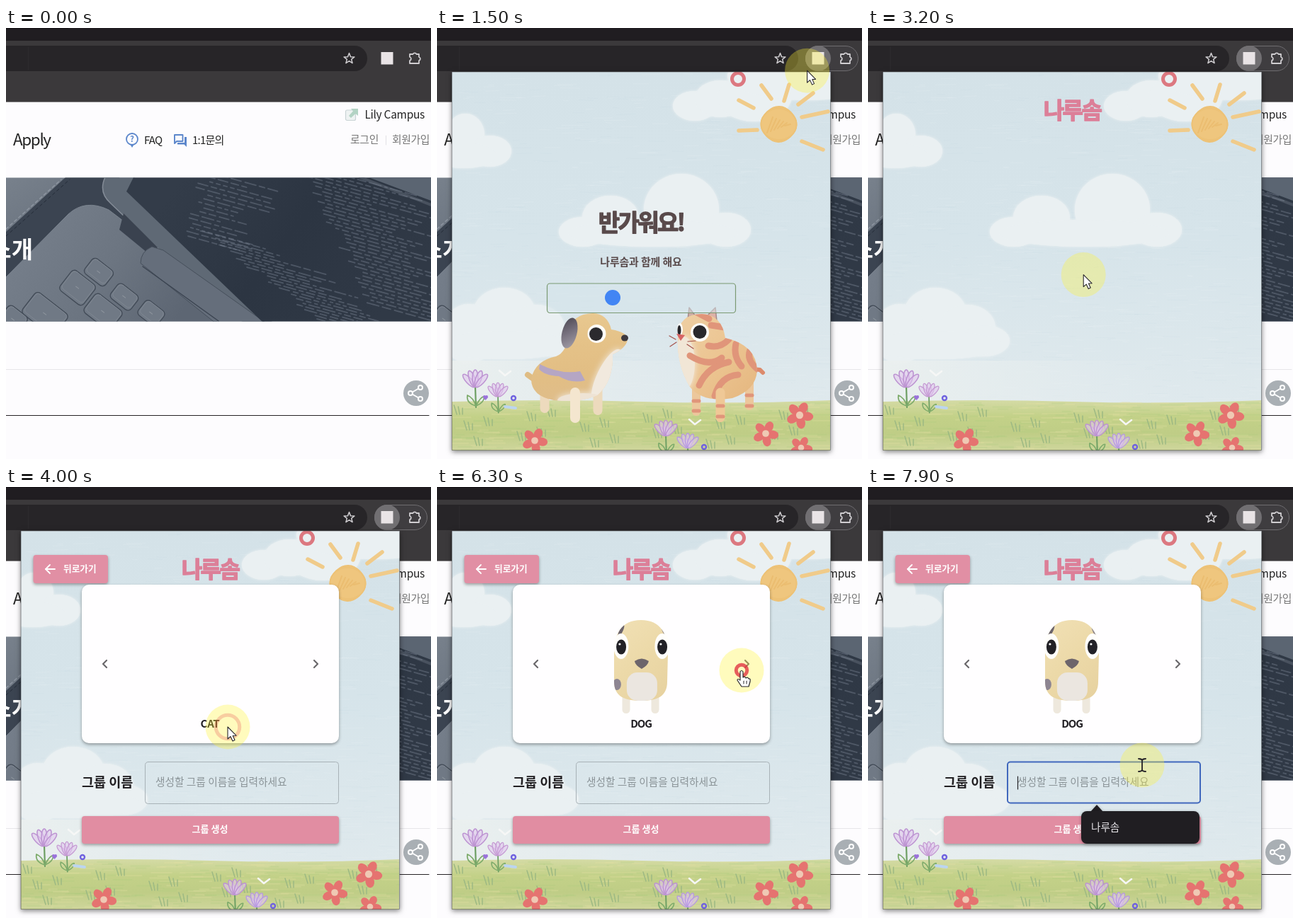
Write an HTML page with a canvas that moves like this. It is 600 px wide and 609 px high and loops after 8000 ms.

```html
<!DOCTYPE html>
<html lang="ko">
<head>
<meta charset="utf-8">
<style>
html, body { margin: 0; width: 600px; height: 609px; overflow: hidden; background: #fdfcfe; }
canvas { display: block; }
</style>
</head>
<body>
<canvas id="stage" width="600" height="609"></canvas>
<script>
const FONT = "'Noto Sans CJK KR', 'Noto Sans KR', 'Noto Sans CJK', 'Noto Sans CJK JP', sans-serif";
const BRAND = '나루솜';
const LOOP = 8000, STEP = 100, TAU = Math.PI * 2;
const stage = document.getElementById('stage').getContext('2d');
let g = stage;

function random(seed) {
  return () => (seed = (seed * 16807) % 2147483647) / 2147483647;
}

// drawing helpers
function paint(fill, stroke, width = 1) {
  if (fill) { g.fillStyle = fill; g.fill(); }
  if (stroke) { g.strokeStyle = stroke; g.lineWidth = width; g.stroke(); }
}
function box(x, y, w, h, r, fill, stroke, width) {
  g.beginPath(); g.roundRect(x, y, w, h, r); paint(fill, stroke, width);
}
function oval(x, y, rx, ry, fill, stroke, width, turn = 0) {
  g.beginPath(); g.ellipse(x, y, rx, ry, turn, 0, TAU); paint(fill, stroke, width);
}
function disc(x, y, r, fill, stroke, width) { oval(x, y, r, r, fill, stroke, width); }
function poly(pts, fill, stroke, width, open) {
  g.beginPath();
  for (let i = 0; i < pts.length; i += 2) g.lineTo(pts[i], pts[i + 1]);
  if (!open) g.closePath();
  paint(fill, stroke, width);
}
function line(pts, color, width) { poly(pts, null, color, width, true); }
function shape(d, fill, stroke, width = 1) {
  const p = new Path2D(d);
  if (fill) { g.fillStyle = fill; g.fill(p); }
  if (stroke) { g.strokeStyle = stroke; g.lineWidth = width; g.stroke(p); }
}
function text(s, x, y, size, color, weight = 400, align = 'left', gap = 0) {
  g.font = `${weight} ${size}px ${FONT}`;
  g.textAlign = align;
  g.letterSpacing = gap + 'px';
  g.fillStyle = color;
  g.fillText(s, x, y + size * 0.37);
}
function heading(s, x, y, size, color) {
  text(s, x, y, size, color, 900, 'center', -size * 0.08);
  g.strokeStyle = color; g.lineWidth = 1.3;
  g.strokeText(s, x, y + size * 0.37);
}
function fade(x0, y0, x1, y1, ...colors) {
  const f = g.createLinearGradient(x0, y0, x1, y1);
  colors.forEach((c, i) => f.addColorStop(i / (colors.length - 1), c));
  return f;
}
function shadow(blur, y, alpha) {
  g.shadowColor = `rgba(0,0,0,${alpha})`; g.shadowBlur = blur; g.shadowOffsetY = y;
}
function noShadow() { g.shadowColor = 'transparent'; g.shadowBlur = g.shadowOffsetY = 0; }
function layer(draw) {
  const c = document.createElement('canvas');
  c.width = 600; c.height = 609;
  g = c.getContext('2d');
  g.lineCap = g.lineJoin = 'round';
  draw();
  g = stage;
  return c;
}

// web page behind the popup
function codeLines(rnd, rows, x0, y0, dx, dy, reach) {
  for (let row = 0; row < rows; row++) {
    g.save();
    g.translate(x0 + row * dx, y0 + row * dy);
    g.rotate(0.27);
    g.setLineDash([1.6, 1]);
    const end = reach * (0.45 + rnd() * 0.55);
    for (let x = rnd() * 22; x < end;) {
      const w = 3 + rnd() * 15;
      line([x, 0, x + w, 0], 'rgba(150,160,174,.3)', 1.9);
      x += w + 5;
    }
    g.restore();
  }
}
function banner() {
  g.save();
  g.beginPath(); g.rect(0, 211.5, 600, 203); g.clip();
  g.fillStyle = fade(0, 211, 60, 300, '#78818c', '#69727e'); g.fillRect(0, 211, 600, 204);
  poly([84, 211, 160, 211, 180, 280, 0, 400, 0, 288], '#3b4451');
  g.setLineDash([4, 4]);
  line([0, 284, 78, 214], '#8d95a0', 1.5);
  line([0, 294, 90, 214], '#242c38', 1);
  g.setLineDash([]);
  shape('M0 352 L88 263 Q112 241 145 257 L280 360 L300 420 L0 420Z', fade(40, 280, 240, 414, '#757e8a', '#6c7581', '#5d6673'), '#7b848f', 1);
  shape('M140 211 Q130 232 148 248 L215 312 L340 420 L380 420 L180 211Z', '#5f6975', '#848c97', 1.5);
  shape('M166 262 L214 310 L205 322 L160 285Z', '#3a424f');
  shape('M190 332 Q190 316 206 309 L222 314 L366 416 L300 420Z', '#656e7b', '#464f5b', 1);
  line([193, 337, 300, 414], '#3b4451', 1.5);
  const screen = new Path2D('M180 211 L600 211 L600 420 L367 420 L170 231Z');
  g.fillStyle = fade(250, 211, 520, 414, '#333c49', '#2c3542', '#303946'); g.fill(screen);
  poly([512, 211, 600, 211, 600, 244], '#5b6572');
  line([500, 211, 600, 250], '#49525f', 4);
  const keys = [[131, 345, 37, 27], [167, 380, 36, 26], [205, 403, 34, 26], [101, 367, 42, 36], [137, 401, 48, 34], [55, 404, 58, 38], [10, 412, 34, 30]];
  for (const [x, y, w, h] of keys) {
    g.save(); g.translate(x, y); g.rotate(0.66);
    box(-w / 2, -h / 2, w, h, 6, '#707985', '#434c58', 1.4);
    box(-w / 2 + 2, -h / 2 + 1, w - 4, h - 5, 5, null, '#818993', 0.8);
    line([-3, 0, 2, 0], '#8f969f', 1);
    g.restore();
  }
  g.clip(screen);
  const rnd = random(41);
  codeLines(rnd, 17, 278, 195, -2, 6, 110);
  codeLines(rnd, 25, 272, 286, 8.5, 6.5, 170);
  codeLines(rnd, 34, 410, 190, 3, 6, 190);
  g.restore();
  text('소개', 38, 313, 33, '#fff', 700, 'right');
}

const page = layer(() => {
  g.fillStyle = '#fdfcfe'; g.fillRect(0, 0, 600, 609);
  g.fillStyle = '#3b393b'; g.fillRect(0, 0, 600, 104.6);
  g.fillStyle = '#201d21'; g.fillRect(0, 0, 600, 18);
  g.fillStyle = '#131114'; g.fillRect(0, 0, 88, 1);
  box(-30, 25, 540, 36, 18, '#272528');
  line([31.5, 27, 31.5, 59], '#2d2b2e', 1);

  const star = [];
  for (let i = 0; i < 10; i++) {
    const a = i * Math.PI / 5 - Math.PI / 2, r = i % 2 ? 3.3 : 7.8;
    star.push(484.5 + Math.cos(a) * r, 43.3 + Math.sin(a) * r);
  }
  poly(star, null, '#cfcdd0', 1.5);

  g.save(); g.translate(479, 113);
  box(0.5, 3, 14, 14.5, 2, '#eef2f2', '#c9d3d5', 1.2);
  poly([8, 1, 18, 1, 18, 11, 14.5, 8, 8, 14, 5, 11, 11, 4.5], '#b3d3c4');
  g.restore();
  text('Lily Campus', 591, 122, 15.5, '#222', 400, 'right', -0.3);
  text('Apply', 10, 158, 22.5, '#222', 400, 'left', -1.4);
  disc(178, 157, 8, null, '#5b86cb', 1.8);
  poly([175, 164, 181, 164, 178, 169], '#5b86cb');
  text('?', 178, 157, 11.5, '#5b86cb', 700, 'center');
  text('FAQ', 195, 158, 15, '#222', 400, 'left', -0.8);
  shape('M238 151 H249.5 V160 H241 L238 163Z', null, '#5b86cb', 1.9);
  shape('M252 154 H255 V168 L251.5 164.5 H242 V162 H252Z', '#5b86cb');
  text('1:1문의', 263, 158, 15, '#222', 400, 'left', -0.8);
  text('로그인', 486, 158, 14.8, '#777', 300, 'left', -0.3);
  line([536.5, 152, 536.5, 165], '#e2e2e5', 1);
  text('회원가입', 545, 158, 14.8, '#777', 300, 'left', -0.4);

  banner();
  line([0, 482.5, 598, 482.5], '#e6e6e9', 1);
  line([0, 547.5, 597, 547.5], '#252225', 1.2);
  disc(579, 516, 18, '#a9afb4');
  line([585, 508, 571, 516, 585, 524], '#fff', 2);
  for (const [x, y] of [[585, 508], [571, 516], [585, 524]]) disc(x, y, 3, '#a9afb4', '#fff', 2);
});

// popup scenery
function cloud(...blobs) {
  g.shadowColor = '#edf2f3'; g.shadowBlur = 4;
  for (const b of blobs) oval(...b, '#eaf0f2');
  noShadow();
  for (const b of blobs) oval(...b, '#eaf0f2');
}
function tulip(x, y, s, color) {
  g.save(); g.translate(x, y); g.scale(s, s);
  line([0, 12, 1, 42], '#6d9f63', 2.2);
  shape('M1 40 Q-13 36 -11 25 Q-3 28 1 40 Q8 26 13 27 Q12 36 1 40', null, '#7dab6a', 1.8);
  for (const a of [-0.75, -0.35, 0, 0.35, 0.75]) {
    g.save(); g.translate(0, 14); g.rotate(a);
    oval(0, -13, 4, 12, 'rgba(226,200,238,.6)', color, 1.6);
    g.restore();
  }
  g.restore();
}
function blossom(x, y, r) {
  for (let i = 0; i < 5; i++) {
    const a = i * TAU / 5 - 1.1;
    oval(x + Math.cos(a) * r * 0.58, y + Math.sin(a) * r * 0.58, r * 0.44, r * 0.33, '#e57370', null, 0, a);
  }
  disc(x, y, r * 0.27, '#efc9b4');
}

const scenery = layer(() => {
  shadow(7, 2, 0.5);
  g.fillStyle = '#d8e5eb'; g.fillRect(21, 62, 534.5, 535);
  noShadow();
  g.beginPath(); g.rect(21, 62, 534.5, 535); g.clip();
  g.fillStyle = fade(0, 62, 0, 530, '#d4e2e8', '#d6e4ea', '#dfe9ed'); g.fillRect(21, 62, 535, 535);
  const rnd = random(7);
  for (let i = 0; i < 700; i++) {
    const x = 21 + rnd() * 534, y = 62 + rnd() * 465;
    line([x, y, x + 6 + rnd() * 25, y + rnd() * 2 - 1], rnd() < 0.6 ? 'rgba(255,255,255,.1)' : 'rgba(150,185,205,.06)', 1);
  }
  cloud([364, 110, 31, 21], [400, 100, 36, 26], [448, 98, 52, 34], [520, 68, 110, 34]);
  cloud([40, 151, 27, 30], [75, 174, 30, 22], [38, 180, 46, 18]);
  cloud([206, 288, 34, 21], [245, 268, 40, 31], [345, 257, 53, 51], [408, 285, 35, 24], [305, 290, 120, 19]);
  cloud([95, 403, 44, 36], [45, 432, 38, 42], [140, 424, 40, 33], [164, 442, 36, 22], [95, 448, 95, 20]);
  g.fillStyle = fade(21, 0, 440, 0, 'rgba(235,240,239,.95)', 'rgba(230,237,239,0)'); g.fillRect(21, 470, 535, 60);

  for (let i = 0; i < 5; i++) oval(482.5, 136, 25 - i % 2 * 3, 22 + i % 2 * 2, '#efc67e', '#edc277', 2, i * 0.8);
  for (let i = 0; i < 6; i++) line([466 + i * 5, 148 - i * 2, 474 + i * 5, 126 + i * 2], '#ebbd70', 2);
  const rays = [[426, 102, 447, 113], [458, 81, 472, 100], [497, 80, 490, 103], [531, 92, 510, 108], [515, 126, 552, 118], [515, 160, 545, 172], [426, 145, 452, 144]];
  for (const r of rays) line(r, '#f0cb8a', 5.5);
  disc(425, 72, 8.5, null, '#dc7880', 5);

  shape('M21 528 Q160 524 290 528 T555 526 V597 H21Z', fade(0, 525, 0, 597, '#d5dba6', '#c3d188', '#bfcd86', '#cfd69c'));
  for (let i = 0; i < 260; i++) {
    const x = 21 + rnd() * 534, y = 529 + rnd() * 68;
    line([x, y, x + 10 + rnd() * 25, y], rnd() < 0.55 ? 'rgba(226,221,160,.28)' : 'rgba(165,198,120,.2)', 2);
  }
  for (let i = 0; i < 24; i++) {
    const x = 32 + (i * 89) % 520, y = 538 + (i * 37) % 50;
    for (let k = -1; k < 2; k++) line([x + k * 4, y + 8, x + k * 6 - 2, y - 3 + k * 2], '#9db983', 1.5);
  }
  tulip(54, 494, 1, '#bd94d2'); tulip(86, 510, 0.8, '#c59ad3');
  tulip(323, 564, 0.9, '#bd94d2'); tulip(354, 582, 0.85, '#b79ae0');
  blossom(138, 583, 18); blossom(512, 547, 19); blossom(464, 573, 18); blossom(514, 593, 16);
  line([88, 484, 96, 491, 104, 485], '#f6f7f6', 2.5);
  line([356, 553, 364, 560, 372, 554], '#f6f7f6', 2.5);
  disc(108, 523, 3, null, '#7063df', 2.4); disc(377, 592, 3, null, '#7063df', 2.4);
  disc(67, 521, 2, '#9a72da'); disc(70, 521, 2, '#9a72da'); poly([65, 522, 72, 522, 68.5, 526], '#9a72da');
  line([96, 535, 111, 537], '#bcd5ef', 4);
});

function leg(x, y0, y1, w, color) { line([x, y0, x, y1 - w / 2], color, w); }

const greeting = layer(() => {
  // dog
  line([128, 490, 142, 500], '#dfbc83', 8);
  leg(152, 510, 544, 13, '#eddabd'); leg(227, 505, 547, 13, '#eddabd');
  const dog = new Path2D('M133 496 Q138 470 168 464 Q184 458 185 430 Q190 404 220 403 Q241 404 246 426 Q270 430 269 441 Q266 453 248 461 Q249 500 226 519 Q200 530 165 526 Q133 520 133 496Z');
  g.save();
  g.fillStyle = fade(190, 405, 200, 528, '#e8c890', '#e5c288', '#e2be84', '#dfbd8a'); g.fill(dog);
  g.clip(dog);
  g.shadowColor = '#f3ece2'; g.shadowBlur = 10;
  oval(240, 492, 14, 42, '#f1e9de', null, 0, 0.45);
  oval(206, 526, 36, 10, '#eee3d5');
  noShadow();
  g.restore();
  leg(195, 515, 558, 14, '#f4e6cf');
  shape('M145 475 Q174 490 202 485 L209 498 Q190 503 172 492 Q152 491 144 482Z', '#b5a6c4');
  oval(187, 431, 10.5, 22, fade(177, 410, 196, 450, '#4b4650', '#77717e', '#a19ca6'), null, 0, 0.25);
  disc(225.5, 432, 13, '#fffdf8'); disc(224.5, 432.5, 9.5, '#2b2a2e');
  oval(265, 438, 5, 4.5, '#3d3940');
  // cat
  line([446, 482, 456, 483, 460, 487], '#dc8a6c', 6);
  leg(366, 510, 548, 12, '#ecc79c'); leg(441, 500, 540, 12, '#ecc79c');
  poly([354, 412, 356, 395, 365, 407], '#cdada6', '#a58a88', 1.5);
  poly([381, 407, 393, 395, 395, 414], '#dcb1a7', '#a58a88', 1.5);
  const cat = new Path2D('M340 436 Q341 404 374 404 Q402 405 407 438 Q451 448 452 484 Q450 512 417 523 Q375 530 357 507 Q338 475 340 436Z');
  g.save();
  g.fillStyle = fade(345, 420, 445, 510, '#eecda0', '#ecc592', '#e6b982'); g.fill(cat);
  g.clip(cat);
  g.shadowColor = '#f4ebdf'; g.shadowBlur = 10;
  oval(349, 474, 15, 38, '#f1e6d6');
  noShadow();
  for (const s of ['M367 402 L384 411', 'M387 420 L412 424', 'M383 449 Q400 453 412 440', 'M357 463 Q384 480 402 466', 'M370 505 Q382 478 412 472', 'M422 446 Q418 464 430 478', 'M442 455 Q436 470 455 484', 'M392 520 Q400 492 425 490'])
    shape(s, null, '#e0957a', 9);
  g.restore();
  leg(400, 515, 557, 13, '#efc896');
  for (const [x, y] of [[366, 527], [366, 541], [400, 534], [400, 549], [441, 519], [441, 534]]) line([x - 4, y, x + 4, y], '#e0957a', 5);
  disc(371, 430, 13, '#fffdf8'); disc(371, 429.5, 9.5, '#29282c');
  oval(343, 426, 4, 9, '#fffdf8'); oval(342, 427, 2.5, 7, '#29282c');
  poly([338, 432, 350, 434, 344, 442], '#d76464');
  for (const w of [[337, 440, 328, 435], [338, 444, 329, 450], [354, 443, 365, 442], [353, 447, 362, 453]]) line(w, '#a45149', 1.2);

  heading('반가워요!', 288, 275, 33, '#594a4b');
  text(BRAND + '과 함께 해요', 288, 330, 14.9, '#594a4b', 700, 'center', -0.1);
});

const form = layer(() => {
  shadow(4, 2, 0.35);
  box(38.5, 96, 105.5, 40, 4, '#e18fa4');
  box(107, 138, 363, 224, 10, '#fffeff');
  box(107, 465, 363, 39, 4, '#e18da2');
  noShadow();
  line([69, 116, 56, 116], '#fff', 1.8);
  line([62, 110, 56, 116, 62, 122], '#fff', 1.8);
  text('뒤로가기', 81, 115, 12.7, '#fff', 700);
  line([142, 245, 137, 250, 142, 255], '#6b696c', 2.2);
  text('그룹 이름', 107, 417, 18.5, '#211f22', 700);
  text('생성할 그룹 이름을 입력하세요', 211, 417, 14.7, '#8b9498', 500);
  text('그룹 생성', 288, 483, 13, '#fff', 700, 'center');
});

// front-facing models in the card
function catModel(s) {
  poly([251, 203, 258, 177, 272, 192], '#d5b0aa', '#8b7f86', 2);
  poly([305, 192, 318, 177, 324, 203], '#d5b0aa', '#8b7f86', 2);
  leg(264, 300, 336, 12, '#f1e2d0'); leg(312, 300, 336, 12, '#f1e2d0');
  const body = new Path2D('M288 189 C322 189 337 215 337 254 C337 298 318 315 288 316 C258 315 239 298 239 254 C239 215 254 189 288 189Z');
  g.save();
  g.fillStyle = fade(239, 200, 337, 310, '#f3dfc4', '#efd5b2', '#ecccaa'); g.fill(body);
  g.clip(body);
  for (const y of [199, 267, 295]) shape(`M235 ${y - 5} Q288 ${y + 8} 342 ${y - 5}`, null, '#e9b594', 10);
  line([282 + s, 188, 282 + s, 214], '#eabf9c', 6);
  line([296 + s, 188, 296 + s, 214], '#eabf9c', 6);
  oval(288 + s, 267, 27, 17, 'rgba(247,235,218,.8)');
  g.restore();
  for (const [x, px] of [[259, 257], [318, 320]]) {
    oval(x + s, 232, 15, 19, '#fffefc');
    oval(px + s, 233, 9.5, 13, '#26252a');
    disc(px + s - 2, 227, 2, '#77757c');
  }
  shape(`M${277 + s} 247 Q${288 + s} 240 ${299 + s} 247 L${288 + s} 261Z`, '#e58573');
  for (const d of [-1, 1])
    for (const [y, e] of [[256, 252], [260, 260], [264, 271]]) line([288 + s + d * 17, y, 288 + s + d * 36, e], '#ae8a72', 1.1);
}
function dogModel(s) {
  leg(267, 290, 320, 11, '#eee8dd'); leg(308, 290, 320, 11, '#eee8dd');
  const body = new Path2D('M288 188 C316 188 326 208 326 235 L325 275 C325 296 311 302 288 302 C265 302 250 296 250 275 L250 235 C250 208 260 188 288 188Z');
  g.save();
  g.fillStyle = fade(250, 200, 326, 290, '#f0dfb3', '#ecd9a8', '#e7d2a0'); g.fill(body);
  g.clip(body);
  oval(259 + s, 203, 2.5, 9, '#6b646c', null, 0, 0.45);
  oval(319 + s, 204, 1.5, 7, '#8b848c', null, 0, -0.45);
  oval(253 + s, 279, 6, 8, '#8d8592');
  box(267 + s, 262, 43, 40, 15, '#ebe6e0');
  g.restore();
  for (const x of [259, 317]) {
    oval(x + s, 225, 10.5, 18, '#fffefb');
    oval(x + s * 1.2, 226, 7, 10.5, '#222126');
    disc(x + s - 2, 222, 1.6, '#fff');
  }
  shape(`M${278 + s} 246 Q${288 + s} 239 ${298 + s} 246 Q${297 + s} 252 ${288 + s} 257 Q${279 + s} 252 ${278 + s} 246Z`, '#6d656b');
}

// pointer
const path = [[500, 640, 290], [1000, 535, 44], [1400, 535, 44], [2150, 279, 376], [2600, 279, 376], [3500, 313, 339],
  [4150, 313, 339], [5000, 439, 239], [5400, 439, 239], [6100, 430, 259], [6450, 430, 259], [7250, 387, 393], [LOOP, 387, 393]];
const clicks = [1040, 2170, 3830, 6250, 7450];

function pointerAt(t) {
  const i = path.findIndex(p => p[0] > t);
  if (i < 1) return null;
  const [t0, x0, y0] = path[i - 1], [t1, x1, y1] = path[i];
  const u = (t - t0) / (t1 - t0), e = u * u * (3 - 2 * u);
  return [x0 + (x1 - x0) * e, y0 + (y1 - y0) * e];
}

function pointer(t) {
  const p = pointerAt(t);
  if (!p) return;
  const [x, y] = p;
  disc(x, y, 31.5, 'rgba(255,242,50,.32)');
  for (const c of clicks) {
    const age = (t - c) / 1000;
    if (age >= 0 && age < 0.22) {
      g.globalAlpha = 1 - age / 0.22;
      disc(x, y, 4 + age * 75, null, '#e0303f', 5);
      g.globalAlpha = 1;
    }
  }
  g.save(); g.translate(x, y);
  const overArrow = t >= 4800 && t < 6700;
  const overInput = t >= 7000;
  if (overInput) {
    shape('M-5 -9 Q-1 -9 0 -7 Q1 -9 5 -9 M0 -7 V7 M-5 9 Q-1 9 0 7 Q1 9 5 9', null, '#242226', 1.8);
  } else if (overArrow) {
    shape('M-2 2 Q0 -1 2 2 V10 Q5 8 6 11 Q9 9 10 12 Q13 11 12 16 L10 23 H0 L-6 14 Q-6 11 -2 14Z', '#fff', '#29272b', 1.2);
    line([3, 15, 3, 19], '#29272b', 1); line([7, 15, 7, 19], '#29272b', 1);
  } else {
    poly([0, 0, 0, 17, 4, 13.5, 7, 20, 10, 18.5, 7.2, 12.5, 12, 12.2], '#fff', '#29272b', 1.1);
  }
  g.restore();
}

function extensions(t) {
  if (t >= 1000) {
    box(520.5, 25.5, 74, 35, 17.5, '#3f3d40', '#6f6d70', 1);
    if (t >= 1400) disc(538, 43, 18, '#716f72');
  }
  box(529.5, 34, 17, 17.5, 0, '#e9e4e6');
  shape('M570 37 H574.5 A2.7 2.7 0 0 1 579.5 37 H583 V41 A2.6 2.6 0 0 1 583 46 V50 H570 V46 A2.6 2.6 0 0 0 570 41Z', null, '#d0ced1', 1.8);
}

function signIn(t) {
  g.drawImage(greeting, 0, 0);
  box(155.5, 361, 266, 41.5, 4, 'rgba(214,230,236,.5)');
  if (t >= 2200) text('SIGNING IN...', 265, 381, 12.3, '#a9b5b9', 400);
  const grow = Math.min(1, Math.max(0, (t - 1950) / 150));
  const shrink = Math.min(1, Math.max(0, (t - 2200) / 172));
  const w = 266 * (grow - shrink);
  if (w > 0) box(155.5, 361, w, 41.5, [4, 0, 0, 4], '#1d1b1e');
  box(155.5, 361, 266, 41.5, 4, null, '#7b9a72', 1.2);
  disc(248, 381, 11, '#4285f4');
}

function groupForm(t) {
  g.drawImage(form, 0, 0);
  const sway = 1.6 * Math.sin((t - 5300) / 800);
  if (t >= 6300) dogModel(sway * 0.6);
  else if (t >= 4300) catModel(sway);
  text(t >= 6300 ? 'DOG' : 'CAT', 288, 334, 15, '#222024', 700, 'center', t >= 6300 ? -1.2 : -0.3);
  if (t < 4800 || t >= 5500) line([435, 245, 440, 250, 435, 255], '#6b696c', 2.2);
  const focus = t >= 7500;
  if (focus) {
    box(197, 388.5, 272, 58, 4, null, '#4168bd', 2);
    if ((t - 7500) % 1000 < 500) line([211.5, 409, 211.5, 427], '#252327', 1.2);
  } else {
    box(196.5, 388.5, 273, 59, 4, null, '#a8b2b7', 1);
  }
  if (t >= 7600) {
    shadow(4, 1, 0.3);
    poly([314, 459, 323, 449, 332, 459], '#201e22');
    box(301, 458, 167, 46, 8, '#201e22');
    noShadow();
    text(BRAND, 315, 481, 14.6, '#e6e4e8');
  }
}

function draw(t) {
  g.drawImage(page, 0, 0);
  extensions(t);
  if (t >= 1400) {
    g.drawImage(scenery, 0, 0);
    if (t < 2900) signIn(t);
    else {
      heading(BRAND, 288, 116, 32, '#dc7f98');
      if (t >= 3900) groupForm(t);
    }
    box(21.5, 62, 534, 534.5, 0, null, 'rgba(60,62,66,.5)', 1);
  }
  pointer(t);
}

stage.lineCap = stage.lineJoin = 'round';
const start = performance.now();
function tick() {
  const t = (performance.now() - start) % LOOP;
  draw(Math.floor(t / STEP) * STEP);
  requestAnimationFrame(tick);
}
tick();
</script>
</body>
</html>
```
